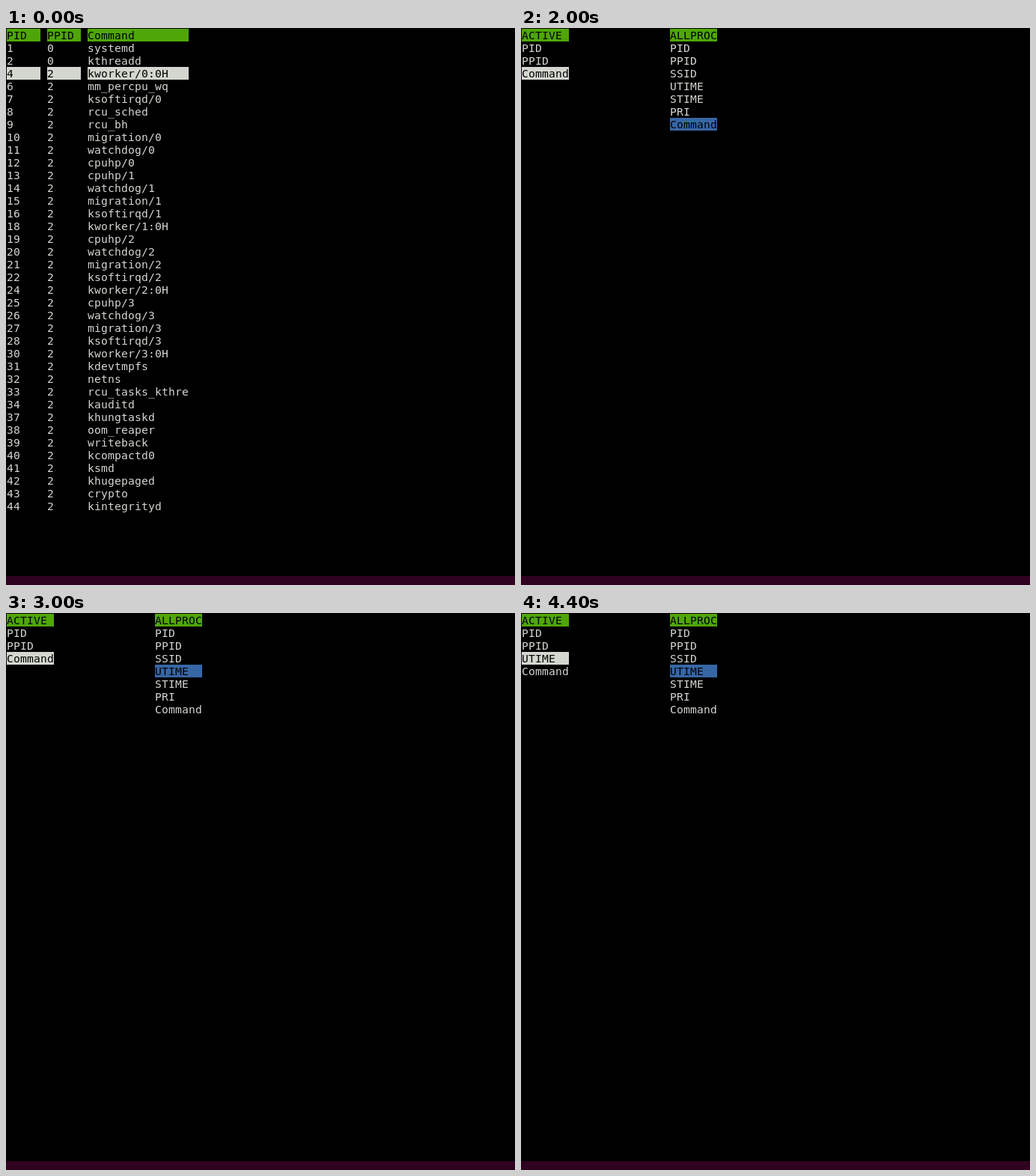
These frames come from a looping animation (680x744 px, 5200 ms). An HTML page:

```html
<!DOCTYPE html>
<html lang="en">
<head>
<meta charset="utf-8">
<title>Process list columns</title>
<style>
  html, body { margin: 0; width: 100%; height: 100%; overflow: hidden; background: #000; }
  #stage { position: relative; width: 680px; height: 744px; overflow: hidden; background: #000; }
  #strip { position: absolute; left: 0; top: 0; width: 680px; animation: screens 5200ms step-end infinite; }
  .screen { position: relative; height: 744px; }
  .cell {
    position: absolute; height: 17px; line-height: 17px; white-space: pre;
    font-family: "DejaVu Sans Mono", monospace; font-size: 14.667px; letter-spacing: 0.17px;
    color: #d3d7cf;
  }
  .head, .focus, .mark { color: #000; }
  .head { background: #4fa608; }
  .focus { background: #d3d7cf; }
  .mark { background: #3766a5; }
  #edge {
    position: absolute; inset: 0; box-sizing: border-box;
    border: solid #12020d; border-width: 1px 0 0 1px;
  }
  #bar { position: absolute; left: 0; top: 732px; width: 680px; height: 12px; background: #2f021f; }
  @keyframes screens {
    0% { transform: translateY(0); }
    11.538% { transform: translateY(-744px); }
    38.461% { transform: translateY(-1488px); }
    50% { transform: translateY(-2232px); }
    53.846% { transform: translateY(-2976px); }
    57.692% { transform: translateY(-3720px); }
    84.615%, 100% { transform: translateY(-4464px); }
  }
</style>
</head>
<body>
<div id="stage">
  <div id="strip"></div>
  <div id="edge"></div>
  <div id="bar"></div>
</div>
<script>
  const CELL_W = 9, CELL_H = 17, PAD = 1;
  const strip = document.getElementById("strip");

  function addScreen() {
    const screen = document.createElement("div");
    screen.className = "screen";
    strip.append(screen);
    return screen;
  }

  // Columns and widths are counted in character cells.
  function addColumn(screen, col, width, lines, selected, style) {
    lines.forEach((text, row) => {
      const cell = document.createElement("span");
      cell.className = "cell " + (row === 0 ? "head" : row === selected ? style : "");
      cell.style.left = PAD + col * CELL_W + "px";
      cell.style.top = PAD + row * CELL_H + "px";
      cell.style.width = width * CELL_W + "px";
      cell.textContent = text;
      screen.append(cell);
    });
  }

  const processes = `1 systemd
2 kthreadd
4 kworker/0:0H
6 mm_percpu_wq
7 ksoftirqd/0
8 rcu_sched
9 rcu_bh
10 migration/0
11 watchdog/0
12 cpuhp/0
13 cpuhp/1
14 watchdog/1
15 migration/1
16 ksoftirqd/1
18 kworker/1:0H
19 cpuhp/2
20 watchdog/2
21 migration/2
22 ksoftirqd/2
24 kworker/2:0H
25 cpuhp/3
26 watchdog/3
27 migration/3
28 ksoftirqd/3
30 kworker/3:0H
31 kdevtmpfs
32 netns
33 rcu_tasks_kthre
34 kauditd
37 khungtaskd
38 oom_reaper
39 writeback
40 kcompactd0
41 ksmd
42 khugepaged
43 crypto
44 kintegrityd`.split("\n").map(line => line.split(" "));

  function addTable() {
    const screen = addScreen();
    const parents = processes.map((_, i) => i < 2 ? "0" : "2");
    addColumn(screen, 0, 5, ["PID", ...processes.map(p => p[0])], 3, "focus");
    addColumn(screen, 6, 5, ["PPID", ...parents], 3, "focus");
    addColumn(screen, 12, 15, ["Command", ...processes.map(p => p[1])], 3, "focus");
  }

  const fields = ["ALLPROC", "PID", "PPID", "SSID", "UTIME", "STIME", "PRI", "Command"];
  const active = ["ACTIVE", "PID", "PPID", "Command"];
  const extended = ["ACTIVE", "PID", "PPID", "UTIME", "Command"];

  function addPicker(left, field, leftStyle, rightStyle) {
    const screen = addScreen();
    addColumn(screen, 0, 7, left, 3, leftStyle);
    addColumn(screen, 22, 7, fields, fields.indexOf(field), rightStyle);
  }

  addTable();
  addPicker(active, "Command", "mark", "focus");
  for (const field of ["Command", "PRI", "STIME", "UTIME"]) {
    addPicker(active, field, "focus", "mark");
  }
  addPicker(extended, "UTIME", "focus", "mark");
</script>
</body>
</html>
```
